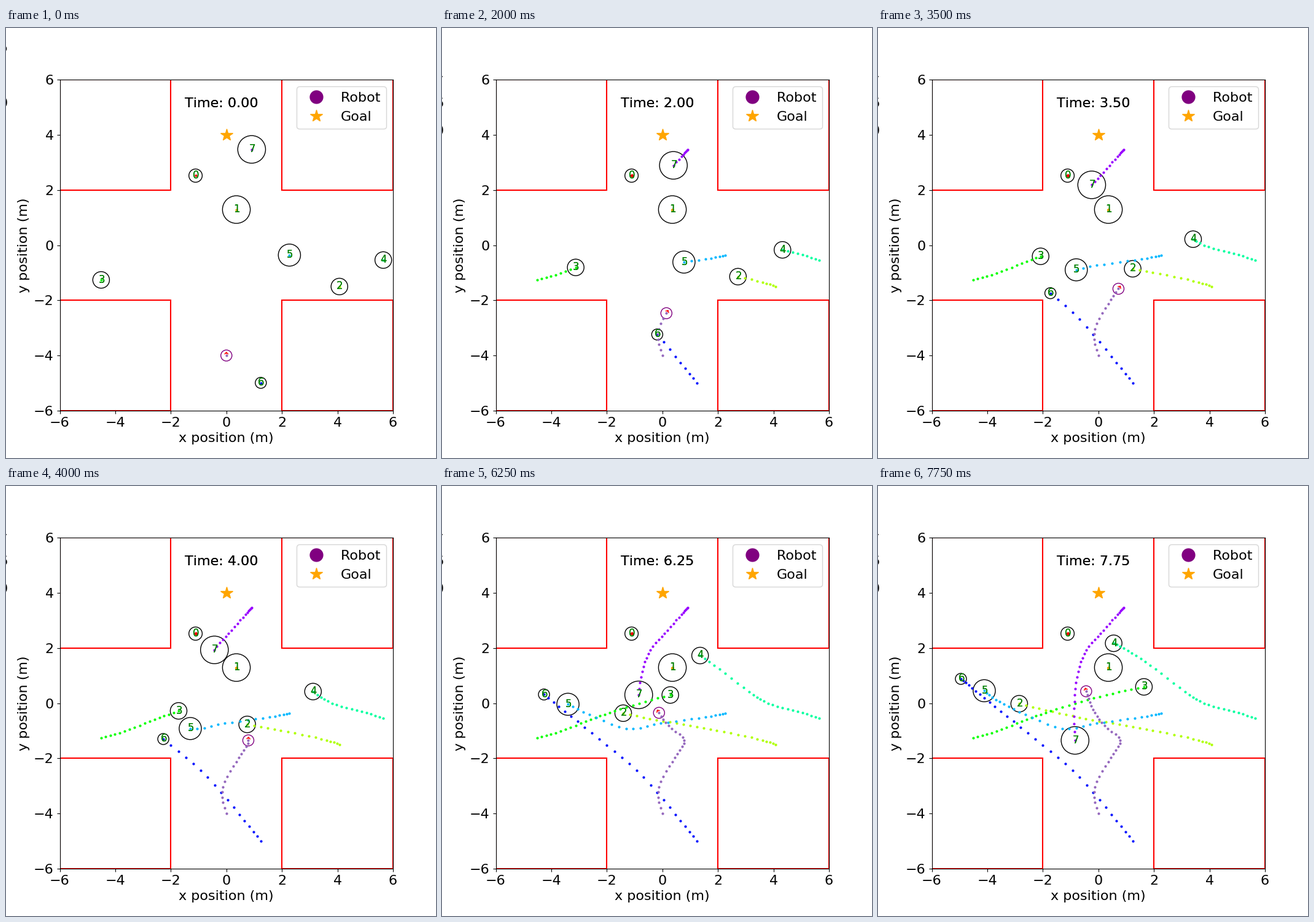
A matplotlib script for the animation above (8000 ms loop, 700x700 px).

```python
import numpy as np
import matplotlib.pyplot as plt
from matplotlib.animation import FuncAnimation
from matplotlib.lines import Line2D
from matplotlib.patches import ArrowStyle, Circle, FancyArrowPatch, Rectangle

STEPS = 32
DT = 0.25
ROBOT_RADIUS = 0.2
FONT = 16
KEY_STEPS = np.array([0, 4, 11, 16, 21, 31])

plt.rcParams["font.family"] = "DejaVu Sans"
plt.rcParams["text.kerning_factor"] = 6
fig, ax = plt.subplots(figsize=(7, 7), dpi=100)
ax.set_xlim(-6, 6)
ax.set_ylim(-6, 6)
ax.tick_params(labelsize=FONT)
ax.set_xlabel("x position (m)", fontsize=FONT)
ax.set_ylabel("y position (m)", fontsize=FONT)


def glide(*keys):
    """Smooth cubic path through one position per key step."""
    keys = np.array(keys)
    slope = np.gradient(keys, KEY_STEPS, axis=0, edge_order=2)
    t = np.arange(STEPS)
    i = np.clip(np.searchsorted(KEY_STEPS, t, "right") - 1,
                0, len(KEY_STEPS) - 2)
    span = np.diff(KEY_STEPS)[i]
    u = ((t - KEY_STEPS[i]) / span)[:, None]
    span = span[:, None]
    ease = u * u * (3 - 2 * u)
    return (keys[i] + ease * (keys[i + 1] - keys[i])
            + span * u * (1 - u) * ((1 - u) * slope[i] - u * slope[i + 1]))


def stand(x, y):
    return np.tile([x, y], (STEPS, 1))


robot_path = glide((0, -4), (-0.15, -3.22), (0.45, -1.97),
                   (0.79, -1.35), (0.22, -0.82), (-0.44, 0.43))

# (radius, path) for each walker
walkers = [
    (0.24, stand(-1.11, 2.52)),
    (0.5, stand(0.36, 1.29)),
    (0.3, glide((4.07, -1.5), (3.6, -1.34), (1.96, -0.99),
                (0.75, -0.77), (-0.45, -0.56), (-2.85, -0.02))),
    (0.3, glide((-4.51, -1.26), (-3.84, -1.08), (-2.58, -0.59),
                (-1.72, -0.28), (-0.61, 0.06), (1.64, 0.59))),
    (0.3, glide((5.65, -0.54), (5.05, -0.35), (3.8, 0),
                (3.12, 0.42), (2.06, 1.24), (0.55, 2.17))),
    (0.4, glide((2.27, -0.36), (1.75, -0.47), (-0.05, -0.73),
                (-1.3, -0.92), (-2.62, -0.41), (-4.11, 0.45))),
    (0.2, glide((1.24, -4.99), (0.65, -4.26), (-0.92, -2.44),
                (-2.27, -1.3), (-3.52, -0.29), (-4.95, 0.88))),
    (0.5, glide((0.91, 3.47), (0.75, 3.29), (0.08, 2.53),
                (-0.43, 1.93), (-0.73, 1.15), (-0.84, -1.35))),
]

# Corner blocks around the crossing
for x in (-6, 2):
    for y in (-6, 2):
        ax.add_patch(Rectangle((x, y), 4, 4, fill=False, ec="red", lw=1.5))

goal = ax.plot([0], [4], "*", color="orange", markersize=15)[0]
robot_key = Line2D([], [], color="purple", marker="o", linestyle="None",
                   markersize=15)
ax.legend([robot_key, goal], ["Robot", "Goal"], fontsize=FONT,
          loc="upper right")


def trail(color):
    return ax.plot([], [], ".", color=color, markersize=4)[0]


def circle(radius, color):
    return ax.add_patch(Circle((0, 0), radius, fill=False, ec=color, lw=1))


def twice(*args, **kwargs):
    return [ax.text(*args, **kwargs) for _ in range(2)]


hues = plt.get_cmap("hsv", 10)
discs, trails, tags = [], [], []
for i, (radius, _) in enumerate(walkers):
    discs.append(circle(radius, "black"))
    trails.append(trail(hues(i)))
    tags.append(twice(0, 0, str(i), color="green", fontsize=12))

robot = circle(ROBOT_RADIUS, "purple")
robot_trail = trail("tab:purple")
arrow = ax.add_patch(FancyArrowPatch(
    (0, 0), (0, 1), color="red",
    arrowstyle=ArrowStyle("->", head_length=2, head_width=2)))
clock = twice(-1.5, 5, "", fontsize=FONT)

# Readouts that end just inside the left edge of the stage, top row first
readouts = [ax.text(-7.88, y, "", fontsize=FONT, ha="right")
            for y in (7, 6, 5, 4)]


def draw(n):
    for (_, track), disc, dots, pair in zip(walkers, discs, trails, tags):
        disc.center = track[n]
        dots.set_data(*track[:n + 1].T)
        for tag in pair:
            tag.set_position(track[n] - 0.1)

    pos = robot_path[n]
    robot.center = pos
    robot_trail.set_data(*robot_path[:n + 1].T)
    move = pos - robot_path[n - 1] if n else np.array([0, 1])
    arrow.set_positions(pos, pos + ROBOT_RADIUS * move / np.hypot(*move))

    for text in clock:
        text.set_text(f"Time: {n * DT:.2f}")
    digits = "5 0 " if n < 3 else " 20 " if n < 8 else " 460"
    for text, digit in zip(readouts, digits):
        text.set_text(digit.strip())
    return []


anim = FuncAnimation(fig, draw, frames=STEPS, interval=250, repeat=True,
                     repeat_delay=0, init_func=lambda: draw(0))
plt.show()
```
